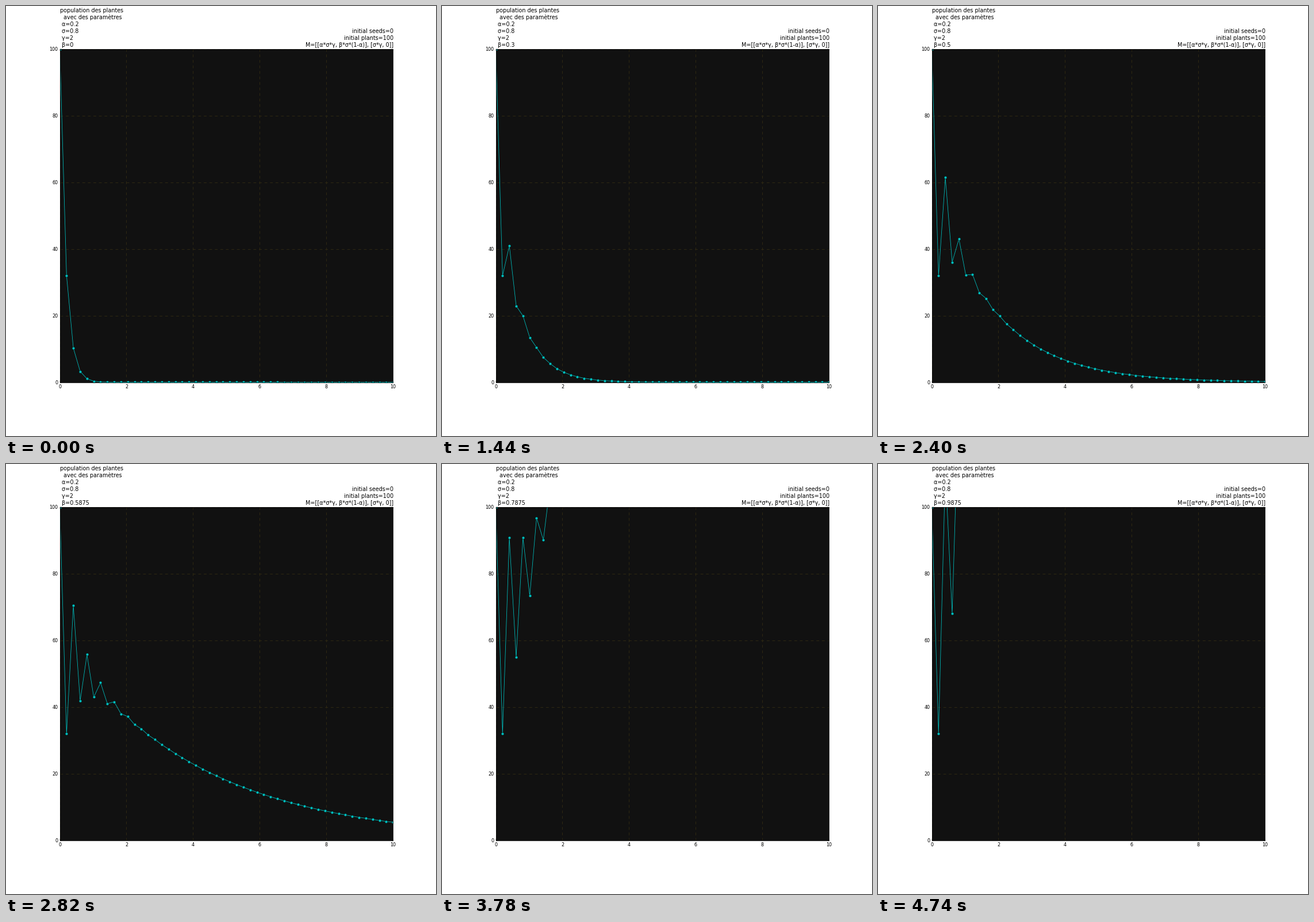
Recreate the animation shown at these times as a matplotlib script. Size 748x748 px, loop 4.8 s.

```python
import numpy as np
import matplotlib.pyplot as plt
from matplotlib.animation import FuncAnimation

SIZE, DPI = 748, 64
PT = 72 / DPI  # points per pixel
FRAMES, INTERVAL = 80, 60
STEPS = 50
ALPHA, SIGMA, GAMMA = 0.2, 0.8, 2
PLANTS, SEEDS = 100, 0

plt.rcParams["font.family"] = "DejaVu Sans"
fig = plt.figure(figsize=(SIZE / DPI, SIZE / DPI), dpi=DPI, facecolor="white")
ax = fig.add_axes([0.125, 0.125, 0.775, 0.775], facecolor="#111111")
ax.set(xlim=(0, 10), ylim=(0, 100))
ax.set_axisbelow(True)
ax.grid(color="#2e2812", lw=PT, linestyle=(0, (4.8, 4.8)))
ax.tick_params(direction="in", top=True, right=True, length=3.2 * PT,
               width=0.4 * PT, pad=3.2 * PT, labelsize=8 * PT)
for spine in ax.spines.values():
    spine.set_linewidth(0.8 * PT)


def caption(lines, x, align):
    """Stack lines upward from just above the axes; return the lowest one."""
    for row, line in enumerate(reversed(lines)):
        text = fig.text(x / SIZE, (677.2 + 12 * row) / SIZE, line, ha=align,
                        va="baseline", fontsize=9.6 * PT, color="black")
        if row == 0:
            lowest = text
    return lowest


beta_text = caption(["population des plantes", "  avec des paramètres",
                     f" α={ALPHA}", f" σ={SIGMA}", f" γ={GAMMA}", " β=0"],
                    93.5, "left")
caption([f"initial seeds={SEEDS}", f"initial plants={PLANTS}",
         "M=[[α*σ*γ, β*σ*(1-α)], [σ*γ, 0]]"], 674, "right")

times = np.linspace(0, 10, STEPS)
curve, = ax.plot([], [], "-o", color=(0, 0.75, 0.75), lw=0.8 * PT,
                 markersize=4.8 * PT, markeredgecolor="black",
                 markeredgewidth=0.4 * PT)


def population(beta):
    matrix = np.array([[ALPHA * SIGMA * GAMMA, beta * SIGMA * (1 - ALPHA)],
                       [SIGMA * GAMMA, 0]])
    state = np.array([PLANTS, SEEDS], float)
    plants = []
    for _ in range(STEPS):
        plants.append(state[0])
        state = matrix @ state
    return plants


def update(frame):
    beta = frame / FRAMES
    curve.set_data(times, population(beta))
    beta_text.set_text(f" β={beta:.4g}")
    return curve, beta_text


anim = FuncAnimation(fig, update, frames=FRAMES, interval=INTERVAL,
                     repeat=True, repeat_delay=0, blit=False)
plt.show()
```
